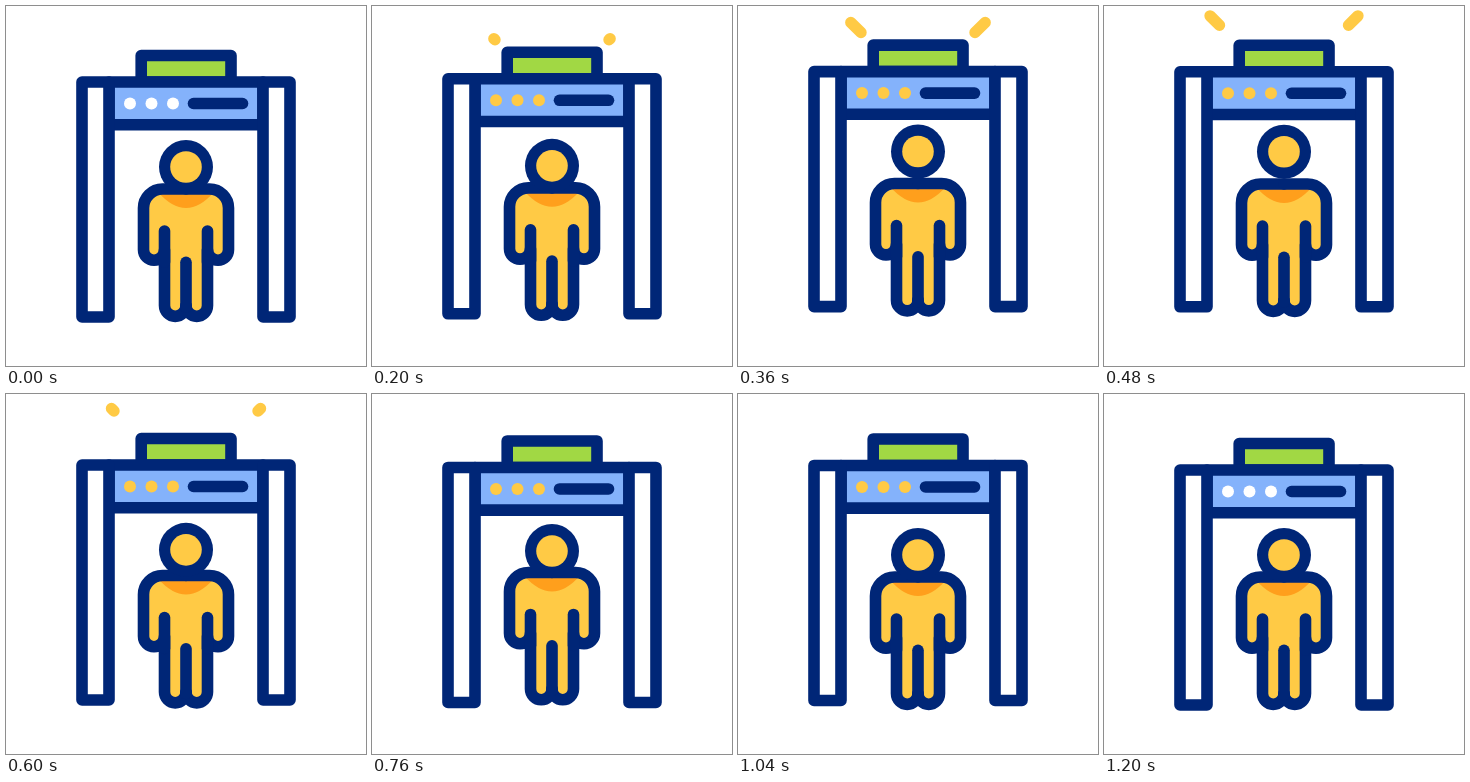
Animation of 360 by 360 pixels, one loop 1240 ms. Source, as an HTML page with a canvas:

```html
<!DOCTYPE html>
<html lang="en">
<head>
<meta charset="utf-8">
<title>Security gate</title>
<style>
html, body { margin: 0; width: 100%; height: 100%; overflow: hidden; background: #fff; }
canvas { display: block; width: 360px; height: 360px; }
</style>
</head>
<body>
<canvas id="stage" width="360" height="360"></canvas>
<script>
const ctx = document.getElementById('stage').getContext('2d');
const LOOP = 1240, STEP = 40, HOLD = 120, REST = 1200;
const NAVY = '#002677', BLUE = '#84b2fb', GREEN = '#a1d844';
const YELLOW = '#ffca45', ORANGE = '#ff9f1c', WHITE = '#fff';
const PEN = 11.6;

const ramp = (t, from, to) => Math.max(0, Math.min(1, (t - from) / (to - from)));
const hop = (t, from, to, height) => -height * Math.sin(Math.PI * ramp(t, from, to));

// Each part makes a high hop, then a lower one
const gateLift = t => hop(t, 150, 680, 11) + hop(t, 680, REST, 5.5);
const bodyLift = t => hop(t, 170, 640, 5.7) + hop(t, 640, 940, 4.8);
const headLift = t => hop(t, 190, 645, 16.8) + hop(t, 645, 940, 4.2);

function line(x1, y1, x2, y2, color = NAVY, width = PEN) {
  ctx.strokeStyle = color;
  ctx.lineWidth = width;
  ctx.beginPath();
  ctx.moveTo(x1, y1);
  ctx.lineTo(x2, y2);
  ctx.stroke();
}

function box(x, y, w, h, fill) {
  ctx.fillStyle = fill;
  ctx.strokeStyle = NAVY;
  ctx.lineWidth = PEN;
  ctx.fillRect(x, y, w, h);
  ctx.strokeRect(x, y, w, h);
}

function disc(x, y, r, fill) {
  ctx.fillStyle = fill;
  ctx.beginPath();
  ctx.arc(x, y, r, 0, Math.PI * 2);
  ctx.fill();
}

function shifted(dy, draw) {
  ctx.save();
  ctx.translate(0, dy);
  draw();
  ctx.restore();
}

function sparks(t) {
  if (t < 180 || t >= 680) return;
  const reach = 17.5;
  const tip = reach * ramp(t, 180, 490);
  const tail = reach * ramp(t, 360, 640);
  for (const side of [-1, 1]) {
    const x = d => 180 + side * (57 + d);
    line(x(tail), 37 - tail, x(tip + 0.01), 37 - tip, YELLOW, 11.4);
  }
}

function gate(t) {
  box(135.2, 49.5, 89.8, 26.5, GREEN);
  box(103, 76, 154, 42.7, BLUE);
  for (const x of [76, 257]) box(x, 76, 27, 235, WHITE);
  const lamp = t >= HOLD && t < REST ? YELLOW : WHITE;
  for (let i = 0; i < 3; i++) disc(124 + i * 21.5, 97.5, 6, lamp);
  line(187.5, 97.5, 236.5, 97.5);
  sparks(t);
}

// Half of the figure, from the neck to between the legs
function halfBody(side) {
  const x = d => 180 + side * d;
  const cup = (d, y, r) => ctx.arc(x(d), y, r, side > 0 ? 0 : Math.PI,
    side > 0 ? Math.PI : 0, side < 0);
  ctx.beginPath();
  ctx.moveTo(180, 183);
  ctx.arcTo(x(42.5), 183, x(42.5), 202, 19);
  ctx.lineTo(x(42.5), 243.8);
  cup(32, 243.8, 10.5);
  ctx.lineTo(x(21.5), 299.6);
  cup(10.75, 299.6, 10.75);
}

function body() {
  for (const side of [-1, 1]) {
    halfBody(side);
    ctx.fillStyle = YELLOW;
    ctx.fill();
  }
  ctx.fillStyle = YELLOW;
  ctx.fillRect(170, 186, 20, 80);
  ctx.fillStyle = ORANGE;
  ctx.beginPath();
  ctx.moveTo(152, 186);
  ctx.quadraticCurveTo(180, 218, 208, 186);
  ctx.fill();
  for (const side of [-1, 1]) {
    halfBody(side);
    ctx.strokeStyle = NAVY;
    ctx.lineWidth = PEN;
    ctx.stroke();
    line(180 + side * 21.5, 225, 180 + side * 21.5, 256);
  }
  line(180, 256.3, 180, 301);
}

function head() {
  disc(180, 161, 27, NAVY);
  disc(180, 161, 15.8, YELLOW);
}

function render(now) {
  let t = Math.floor((now % LOOP) / STEP) * STEP;
  if (t < HOLD) t = 0;
  ctx.fillStyle = WHITE;
  ctx.fillRect(0, 0, 360, 360);
  ctx.lineCap = ctx.lineJoin = 'round';
  shifted(gateLift(t), () => gate(t));
  shifted(bodyLift(t), body);
  shifted(headLift(t), head);
}

const start = performance.now();
function tick() {
  render(performance.now() - start);
  requestAnimationFrame(tick);
}
tick();
</script>
</body>
</html>
```
